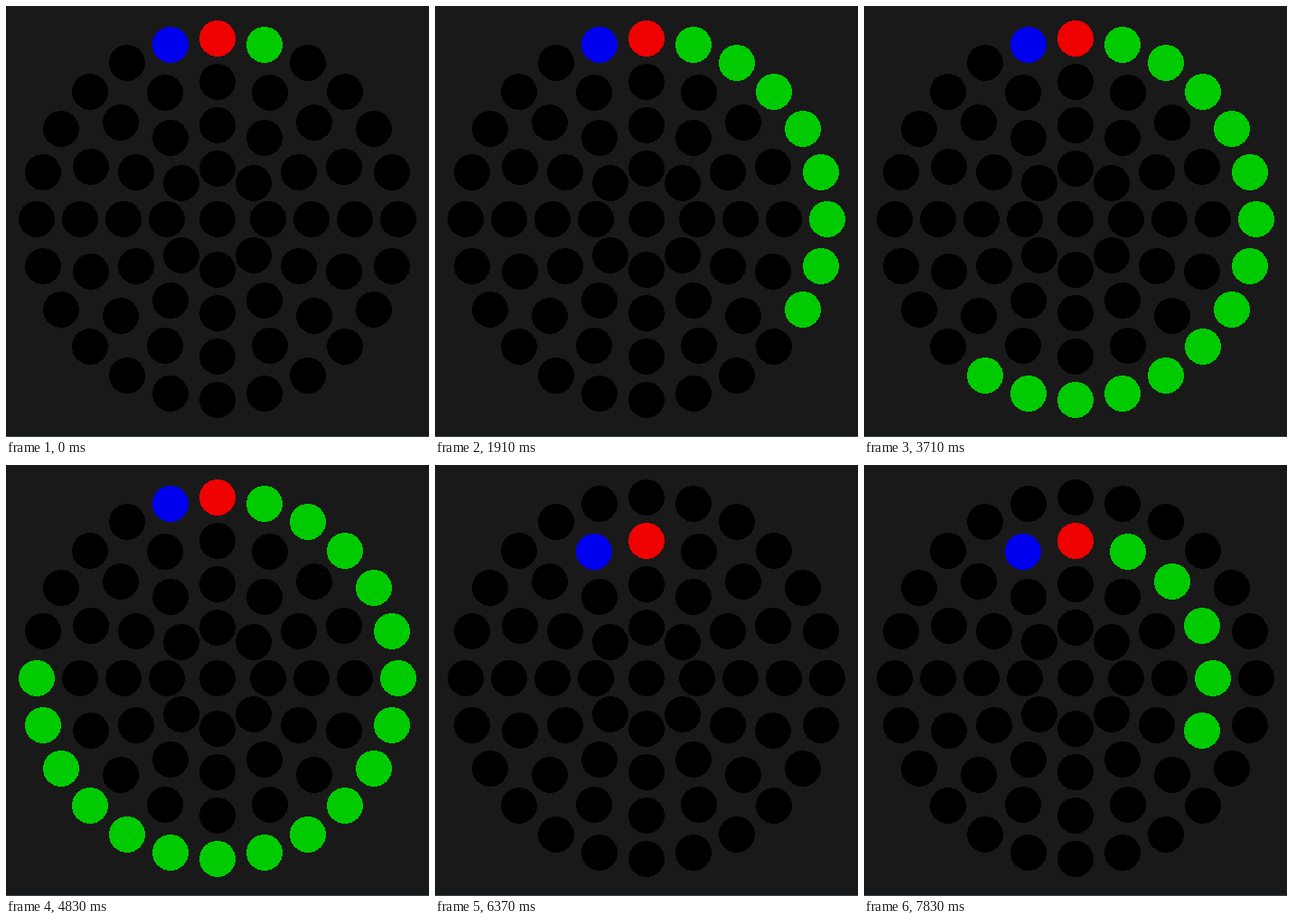
Write an HTML page that moves like this. It is 468 px wide and 477 px high and loops after 8 s.

```html
<!DOCTYPE html>
<html lang="en">
<head>
<meta charset="utf-8">
<title>Ring lights</title>
<style>
  html, body { margin: 0; width: 100%; height: 100%; overflow: hidden; background: #191919; }
  svg { display: block; width: 468px; height: 477px; }
</style>
</head>
<body>
<svg id="stage" viewBox="0 0 468 477" shape-rendering="crispEdges">
  <rect width="468" height="477" fill="#191919"/>
  <rect y="476" width="468" height="1" fill="#34434d"/>
</svg>
<script>
const NS = "http://www.w3.org/2000/svg";
const LOOP = 8000;
const OFF = "#000000", RED = "#f00000", GREEN = "#00cb00", BLUE = "#0000f0";
const CX = 234, CY = 236;
const stage = document.getElementById("stage");

// Moments at which the chase advances by one light
const steps = [120, 450, 710, 1040, 1300, 1630, 1910, 2170, 2500, 2760,
  3090, 3360, 3710, 3970, 4300, 4560, 4830, 5160, 5440, 5770, 6040,
  6370, 6630, 6960, 7220, 7500, 7830];

function addDot(radius, turn) {
  const dot = document.createElementNS(NS, "circle");
  const angle = turn * 2 * Math.PI;
  dot.setAttribute("cx", Math.round(CX + radius * Math.sin(angle)));
  dot.setAttribute("cy", Math.round(CY - radius * Math.cos(angle)));
  dot.setAttribute("r", 20);
  dot.setAttribute("fill", OFF);
  stage.appendChild(dot);
  return dot;
}

function addRing(radius, count) {
  return Array.from({ length: count }, (_, i) => addDot(radius, i / count));
}

const outer = addRing(200, 24);
const inner = addRing(152, 16);
addRing(104, 12);
addRing(56, 8);
addDot(0, 0);

// head < 0 switches the whole ring off
function paint(ring, head) {
  const last = ring.length - 1;
  ring.forEach((dot, i) => {
    let color = OFF;
    if (head >= 0) {
      if (i === 0) color = RED;
      else if (i === last) color = BLUE;
      else if (i <= head) color = GREEN;
    }
    dot.setAttribute("fill", color);
  });
}

let shown = -1;
function render(time) {
  const t = time % LOOP;
  const head = 1 + steps.filter(s => s <= t).length;
  if (head === shown) return;
  shown = head;
  const lead = outer.length - 1;
  paint(outer, head < lead ? head : -1);
  paint(inner, head - lead);
}

const start = performance.now();
function tick() {
  render(performance.now() - start);
  requestAnimationFrame(tick);
}
render(0);
requestAnimationFrame(tick);
</script>
</body>
</html>
```
